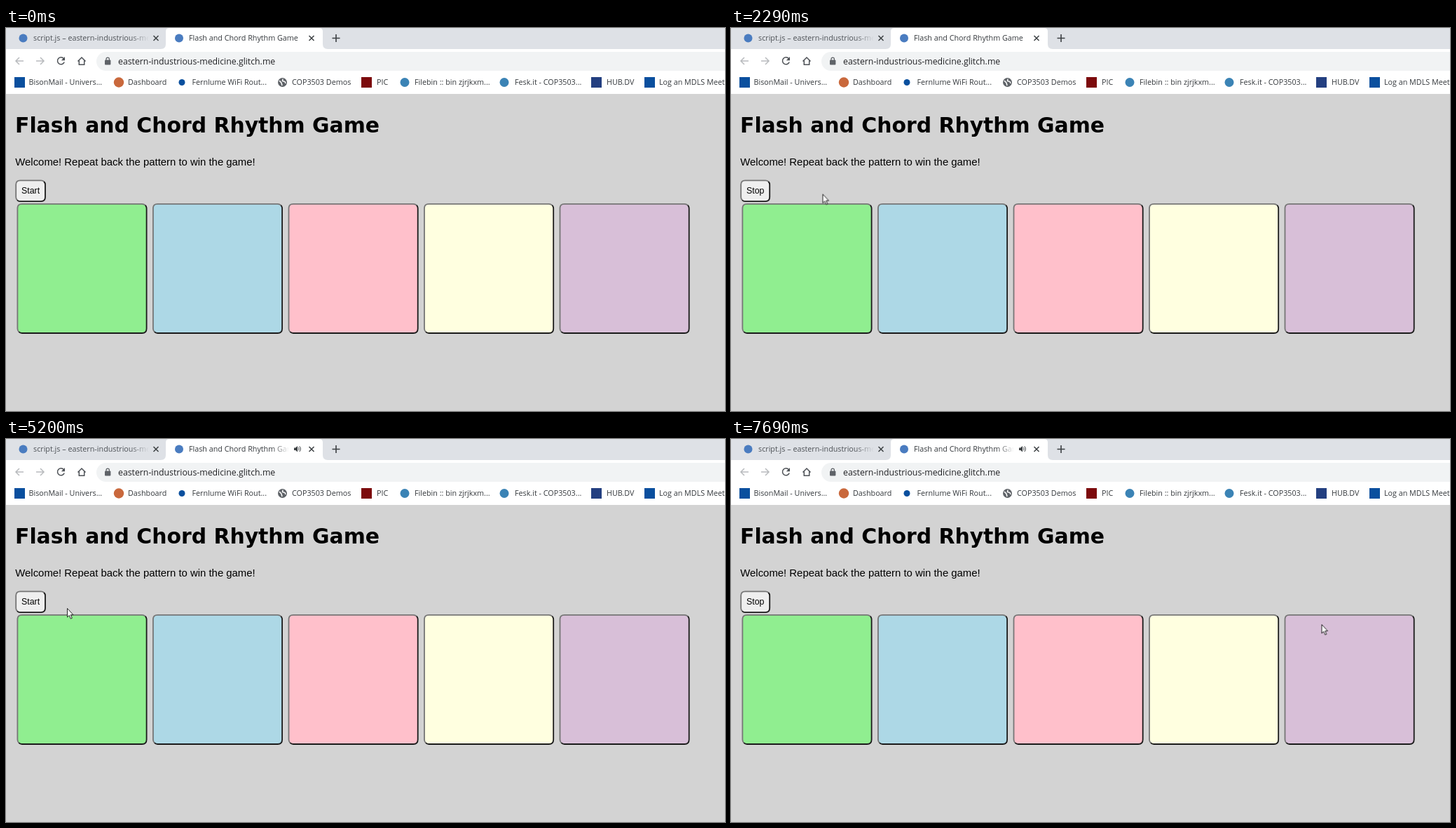
An HTML page for the animation above (8 s loop, 1026 by 546 pixels).

```html
<!DOCTYPE html>
<html lang="en">
<head>
<meta charset="utf-8">
<title>Flash and Chord Rhythm Game</title>
<style>
html, body { margin: 0; width: 100%; height: 100%; overflow: hidden; background: #d3d3d3; }
body { position: relative; }
.stage { position: absolute; left: 0; top: 0; display: block; }
.ui { font: 10.75px "Open Sans", "Noto Sans", sans-serif; fill: #35393d; }
.url { font-size: 12.3px; fill: #202124; }
.page { font: 14.9px "Liberation Sans", Arial, sans-serif; fill: #000; }
.page .head { font: bold 29.85px "DejaVu Sans", sans-serif; }
.page .label { font-size: 12.4px; }

.lit { fill: none; stroke: #767676; stroke-width: 1.8; }
.shade { fill: none; stroke: #1a1a1a; stroke-width: 1.8; }

.strip { animation: focus 8s step-end infinite; }
.audio { animation: audio 8s step-end infinite; }
.start { animation: start 8s step-end infinite; }
.stop { animation: stop 8s step-end infinite; }
.btn .lit { animation: pressLit 8s step-end infinite; }
.btn .shade { animation: pressShade 8s step-end infinite; }
.lamp { animation: lamp 8s step-end infinite; }
.cursor { animation: move 8s linear infinite, show 8s step-end infinite; }

@keyframes focus { 0%, 22.5% { fill: #dee1e6; } 4% { fill: #e7eaed; } }
@keyframes audio { 0% { visibility: hidden; } 53.125% { visibility: visible; } }
@keyframes start { 0%, 49.125% { visibility: visible; } 24.375%, 71.5% { visibility: hidden; } }
@keyframes stop { 0%, 49.125% { visibility: hidden; } 24.375%, 71.5% { visibility: visible; } }
@keyframes pressLit {
  0%, 24.375%, 49.125%, 71.5% { stroke: #767676; }
  22.5%, 47.25%, 69.6% { stroke: #1a1a1a; }
}
@keyframes pressShade {
  0%, 24.375%, 49.125%, 71.5% { stroke: #1a1a1a; }
  22.5%, 47.25%, 69.6% { stroke: #767676; }
}
@keyframes lamp {
  0%, 49.125%, 96.125% { fill: #d8bfd8; }
  36.875%, 84.125% { fill: purple; }
}
@keyframes show { 0% { visibility: hidden; } 3.375% { visibility: visible; } }
@keyframes move {
  0%, 3.375% { transform: translate(506px, 492px); }
  6% { transform: translate(330px, 372px); }
  9% { transform: translate(150px, 250px); }
  11.5%, 14.2% { transform: translate(118px, 220px); }
  16%, 17.5% { transform: translate(55px, 220px); }
  20.4%, 25.6% { transform: translate(43px, 228px); }
  28.5%, 37.6% { transform: translate(130.5px, 236.5px); }
  39.6%, 41.6% { transform: translate(50px, 235px); }
  43.9%, 51.1% { transform: translate(44px, 234px); }
  57.6%, 62% { transform: translate(245px, 236px); }
  65%, 65.55% { transform: translate(87px, 241px); }
  67.5%, 73.5% { transform: translate(42px, 228px); }
  77.75%, 81.7% { transform: translate(406px, 188px); }
  83.5%, 84.05% { transform: translate(605.5px, 207.5px); }
  86.5% { transform: translate(745px, 228px); }
  91%, 100% { transform: translate(842.5px, 264px); }
}
</style>
</head>
<body>
<svg class="stage" width="1026" height="546" viewBox="0 0 1026 546">
  <defs>
    <linearGradient id="dim" gradientUnits="userSpaceOnUse" x1="178" x2="204">
      <stop stop-color="#4d5156"/><stop offset="1" stop-color="#4d5156" stop-opacity="0"/>
    </linearGradient>
    <linearGradient id="veil">
      <stop stop-color="#fff" stop-opacity="0"/><stop offset="1" stop-color="#fff"/>
    </linearGradient>
    <path id="close" d="M-3.5-3.5L3.5 3.5M3.5-3.5L-3.5 3.5" fill="none" stroke="#3c4043" stroke-width="1.5"/>
    <g id="tile">
      <rect x=".9" y=".9" width="184.2" height="184.2" rx="6.5"/>
      <path class="lit" d="M2.8 183.2Q.9 181.3 .9 178.6V7.4Q.9 .9 7.4 .9H178.6Q181.3 .9 183.2 2.8"/>
      <path class="shade" d="M183.2 2.8Q185.1 4.7 185.1 7.4V178.6Q185.1 185.1 178.6 185.1H7.4Q4.7 185.1 2.8 183.2"/>
    </g>
  </defs>

  <rect class="strip" width="1026" height="30" fill="#dee1e6"/>
  <rect y="30" width="1026" height="64" fill="#fff"/>
  <path d="M221 30Q228 30 228 23V5Q228 0 233 0H447Q452 0 452 5V23Q452 30 459 30Z" fill="#fff"/>
  <g fill="#4a7cc0"><circle cx="24.5" cy="14.5" r="6"/><circle cx="247" cy="14.5" r="6"/></g>
  <g class="ui">
    <text x="39" y="18" style="fill:url(#dim)">script.js – eastern-industrious-medicine</text>
    <text x="261" y="18">Flash and Chord Rhythm Game</text>
  </g>
  <g class="audio">
    <rect x="380" y="3" width="24" height="23" fill="url(#veil)"/>
    <rect x="403.5" y="3" width="22" height="23" fill="#fff"/>
    <path d="M411 12.5H413.2L416 10V18.5L413.2 16H411Z" fill="#3c4043"/>
    <path d="M417.4 12.2Q419 14.2 417.4 16.2M418.8 10.4Q422 14.2 418.8 18" fill="none" stroke="#3c4043"/>
  </g>
  <use href="#close" x="214" y="14.5"/>
  <use href="#close" x="436" y="14.5"/>
  <path d="M471 9V20M465.5 14.5H476.5" stroke="#3c4043" stroke-width="1.6"/>

  <g fill="none" stroke-width="1.5">
    <g stroke="#b9bbbe">
      <path d="M25 47H14M19 42L14 47L19 52"/>
      <path d="M43 47H54M49 42L54 47L49 52"/>
    </g>
    <g stroke="#4d5156">
      <path d="M82.4 43.6A5 5 0 1 0 83.2 48.5"/>
      <path d="M102.5 47.5L108 42L113.5 47.5M104.3 46.5V52.2H111.7V46.5"/>
    </g>
  </g>
  <path d="M84 41V46.2H78.8Z" fill="#4d5156"/>
  <rect x="129" y="34" width="920" height="27" rx="13.5" fill="#f1f3f4"/>
  <rect x="141" y="45.5" width="8.4" height="7" rx="1" fill="#5f6368"/>
  <path d="M143 46V44.3A2.2 2.2 0 0 1 147.4 44.3V46" fill="none" stroke="#5f6368" stroke-width="1.2"/>
  <text class="ui url" x="160" y="52">eastern-industrious-medicine.glitch.me</text>

  <g fill="#0a4f9e">
    <rect x="12" y="70" width="15" height="15"/>
    <rect x="911" y="70" width="15" height="15"/>
    <circle cx="251" cy="77.5" r="4.5"/>
  </g>
  <rect x="835" y="70" width="15" height="15" fill="#233f80"/>
  <circle cx="161" cy="77.5" r="7.2" fill="#c9683c"/>
  <rect x="507" y="70" width="15" height="15" fill="#7c0a0c"/>
  <g fill="#3b83b5"><circle cx="569" cy="77.5" r="6.5"/><circle cx="711" cy="77.5" r="6.5"/></g>
  <circle cx="394.5" cy="77.5" r="6.5" fill="#5f6368"/>
  <path d="M390 75L393 78.2L394 82M395 72.5L394.5 75.5L398 76.5L399 79" fill="none" stroke="#fff" stroke-width="1.5"/>
  <g class="ui">
    <text x="32.5" y="81">BisonMail - Univers...</text>
    <text x="174" y="81">Dashboard</text>
    <text x="265.5" y="81">Fernlume WiFi Rout...</text>
    <text x="408" y="81">COP3503 Demos</text>
    <text x="529" y="81">PIC</text>
    <text x="583" y="81">Filebin :: bin zjrjkxm...</text>
    <text x="726" y="81">Fesk.it - COP3503...</text>
    <text x="857" y="81">HUB.DV</text>
    <text x="932" y="81">Log an MDLS Meeting</text>
  </g>

  <g class="page">
    <text class="head" x="13" y="149">Flash and Chord Rhythm Game</text>
    <text x="13.3" y="195.5">Welcome! Repeat back the pattern to win the game!</text>
    <g class="btn start">
      <rect x="14.2" y="217.3" width="41.8" height="29.8" rx="6" fill="#efefef"/>
      <path class="lit" d="M16 245.3Q14.2 243.5 14.2 241V223.3Q14.2 217.3 20.2 217.3H50Q52.5 217.3 54.2 219"/>
      <path class="shade" d="M54.2 219Q56 220.8 56 223.3V241Q56 247.1 50 247.1H20.2Q17.7 247.1 16 245.3"/>
      <text class="label" x="22" y="236">Start</text>
    </g>
    <g class="btn stop">
      <rect x="14.2" y="217.3" width="41" height="29.8" rx="6" fill="#efefef"/>
      <path class="lit" d="M16 245.3Q14.2 243.5 14.2 241V223.3Q14.2 217.3 20.2 217.3H49.2Q51.7 217.3 53.4 219"/>
      <path class="shade" d="M53.4 219Q55.2 220.8 55.2 223.3V241Q55.2 247.1 49.2 247.1H20.2Q17.7 247.1 16 245.3"/>
      <text class="label" x="22" y="236">Stop</text>
    </g>
  </g>

  <use href="#tile" x="15.5" y="249.9" fill="#90ee90"/>
  <use href="#tile" x="209" y="249.9" fill="#add8e6"/>
  <use href="#tile" x="402.6" y="249.9" fill="#ffc0cb"/>
  <use href="#tile" x="596.1" y="249.9" fill="#ffffe0"/>
  <use class="lamp" href="#tile" x="789.6" y="249.9" fill="#d8bfd8"/>

  <path class="cursor" d="M.5 .5V13L3.3 10.4L5.3 15.2L7.3 14.3L5.3 9.7H9Z" fill="#fff" stroke="#111" stroke-width=".9"/>
</svg>
</body>
</html>
```
